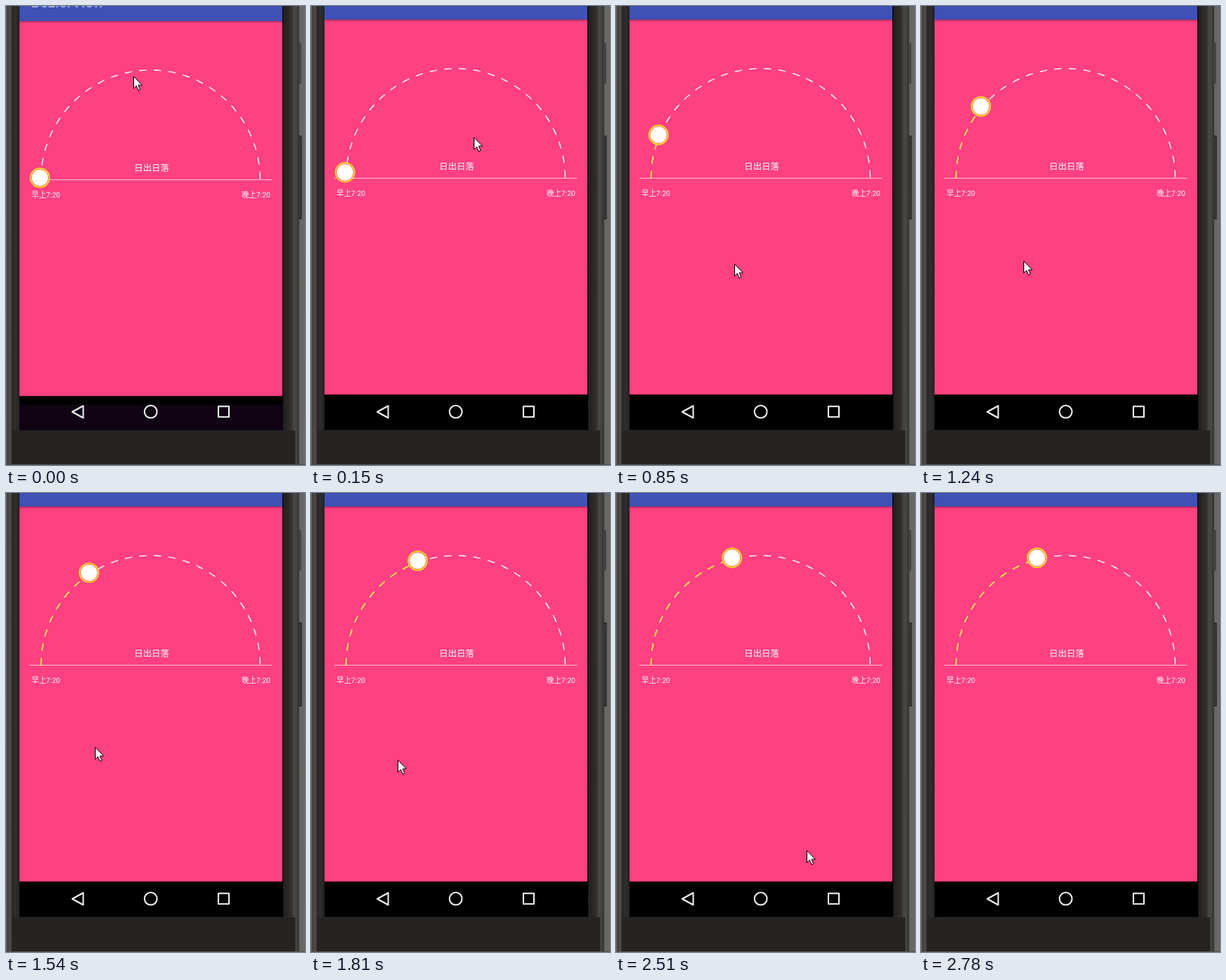
These frames come from a looping animation (397 px wide and 609 px high, 3.03 s). An HTML page:

```html
<!DOCTYPE html>
<html lang="zh">
<head>
<meta charset="utf-8">
<title>日出日落</title>
<style>
  html, body { margin: 0; width: 100%; height: 100%; overflow: hidden; background: #252422; }
  svg { display: block; width: 397px; height: 609px; }
  text { font-family: Roboto, "Noto Sans CJK SC", "Noto Sans CJK", sans-serif; fill: #fff; }
  .dash { fill: none; stroke-width: 1.4; stroke-dasharray: 9.7 9.7; }
  .nav { fill: none; stroke: #ececec; stroke-width: 2; stroke-linejoin: round; }
</style>
</head>
<body>
<svg viewBox="0 0 397 609">
  <defs>
    <linearGradient id="left">
      <stop offset="0" stop-color="#65625f"/>
      <stop offset=".08" stop-color="#5a5855"/>
      <stop offset=".12" stop-color="#2c2b29"/>
      <stop offset=".2" stop-color="#504e4b"/>
      <stop offset=".38" stop-color="#474542"/>
      <stop offset=".44" stop-color="#292826"/>
      <stop offset=".7" stop-color="#2f2e2c"/>
      <stop offset="1" stop-color="#242321"/>
    </linearGradient>
    <linearGradient id="right">
      <stop offset="0" stop-color="#201f1e"/>
      <stop offset=".3" stop-color="#2b2a28"/>
      <stop offset=".42" stop-color="#343331"/>
      <stop offset=".5" stop-color="#4a4845"/>
      <stop offset=".66" stop-color="#454340"/>
      <stop offset=".7" stop-color="#282725"/>
      <stop offset=".74" stop-color="#55534f"/>
      <stop offset=".78" stop-color="#666"/>
      <stop offset="1" stop-color="#6a6a6a"/>
    </linearGradient>
    <linearGradient id="shade" x2="0" y2="1">
      <stop offset="0" stop-color="#000" stop-opacity=".32"/>
      <stop offset="1" stop-color="#000" stop-opacity="0"/>
    </linearGradient>
  </defs>

  <rect width="397" height="609" fill="#252422"/>
  <rect width="18" height="609" fill="url(#left)"/>
  <rect x="367" width="30" height="609" fill="url(#right)"/>
  <rect x="8" y="563" width="376" height="46" fill="#252422"/>
  <rect y="608" width="397" height="1" fill="#55534f"/>
  <rect x="388.5" y="49" width="3.5" height="54" rx="1" fill="#444"/>
  <rect x="389" y="172" width="4" height="111" rx="1.5" fill="#363636"/>
  <path d="M389 172.5h3.5M389 282.5h3.5" stroke="#1c1c1c"/>

  <rect x="18" width="350" height="562.5" fill="#000"/>
  <rect id="navTint" x="18" y="529" width="350" height="33.5" fill="#0f0314"/>

  <g id="app">
    <rect x="18" y="-4" width="349" height="519.5" fill="#ff4081"/>
    <rect x="18" y="-4" width="349" height="22" fill="#3f51b5"/>
    <rect x="18" y="18" width="349" height="3" fill="url(#shade)"/>
    <text id="title" x="33" y="-.5" font-size="19.4" font-weight="500" opacity=".5">BezierView</text>
    <path d="M31 228.5H353.5" stroke="#fff" stroke-opacity=".65"/>
    <path class="dash" stroke="#fff" d="M46.5 228.5A145.5 145.5 0 0 1 337.5 228.5"/>
    <path class="dash" id="passed" stroke="#ffeb1c"/>
    <text x="170.3" y="217.3" font-size="11.6">日出日落</text>
    <text x="34" y="251.5" font-size="9.7">早上7:20</text>
    <text x="313" y="251.5" font-size="9.7">晚上7:20</text>
    <g id="sun">
      <circle r="12.6" fill="#ff4081" stroke="#ffe818" stroke-width="1.7"/>
      <circle r="11.2" fill="#fff" stroke="#f5853f" stroke-width=".6"/>
    </g>
  </g>

  <path class="nav" d="M102.5 530.5V546.5L88 538.5Z"/>
  <circle class="nav" cx="192.2" cy="538.3" r="8.3"/>
  <rect class="nav" x="282" y="531.3" width="14" height="14"/>

  <path id="cursor" d="M.5 .5V16.3L4.1 12.9L6.7 18.9L9.2 17.8L6.7 12H11.6Z" fill="#fff" stroke="#000"/>
</svg>
<script>
  const LOOP = 3030, CX = 192, CY = 228.5, R = 145.5, SUN_R = 147;
  // start ms, sun angle in degrees, cursor x, cursor y (no cursor when absent)
  const steps = [
    [0, .8, 169, 93], [150, 2.8, 216, 174], [310, 5.5, 209, 205],
    [460, 9, 200, 250], [580, 13, 191, 290], [730, 18, 174, 318],
    [850, 22.8, 157, 342], [1000, 28.5, 150, 341], [1120, 34.2, 143, 339],
    [1240, 40.1, 136, 338], [1390, 47.4, 138, 336], [1540, 56.2, 118, 337],
    [1690, 64, 117, 345], [1810, 70, 115, 354], [1930, 75, 113, 363],
    [2080, 75, 107, 367], [2360, 75, 164, 378], [2510, 75, 253, 474],
    [2630, 75, 342, 570], [2780, 75]
  ];
  const $ = id => document.getElementById(id);
  const move = (el, x, y) => el.setAttribute('transform', `translate(${x} ${y})`);
  const show = (el, on) => el.setAttribute('visibility', on ? 'visible' : 'hidden');
  const onArc = (deg, r) => {
    const a = deg * Math.PI / 180;
    return [CX - r * Math.cos(a), CY - r * Math.sin(a)];
  };
  const [app, title, tint, sun, passed, cursor] =
    ['app', 'title', 'navTint', 'sun', 'passed', 'cursor'].map($);
  let last;

  function draw(now) {
    const t = now % LOOP;
    const step = steps.findLast(s => s[0] <= t);
    if (step !== last) {
      last = step;
      const [start, deg, x, y] = step;
      const settling = start === 0;
      move(app, 0, settling ? 2 : 0);
      show(title, settling);
      show(tint, settling);
      const [sx, sy] = onArc(deg, SUN_R);
      move(sun, sx, sy - .5);
      passed.setAttribute('d', `M${CX - R} ${CY}A${R} ${R} 0 0 1 ${onArc(deg, R).join(' ')}`);
      show(cursor, x !== undefined);
      if (x !== undefined) move(cursor, x, y);
    }
  }

  const origin = performance.now();
  function tick() {
    draw(performance.now() - origin);
    requestAnimationFrame(tick);
  }
  tick();
</script>
</body>
</html>
```
